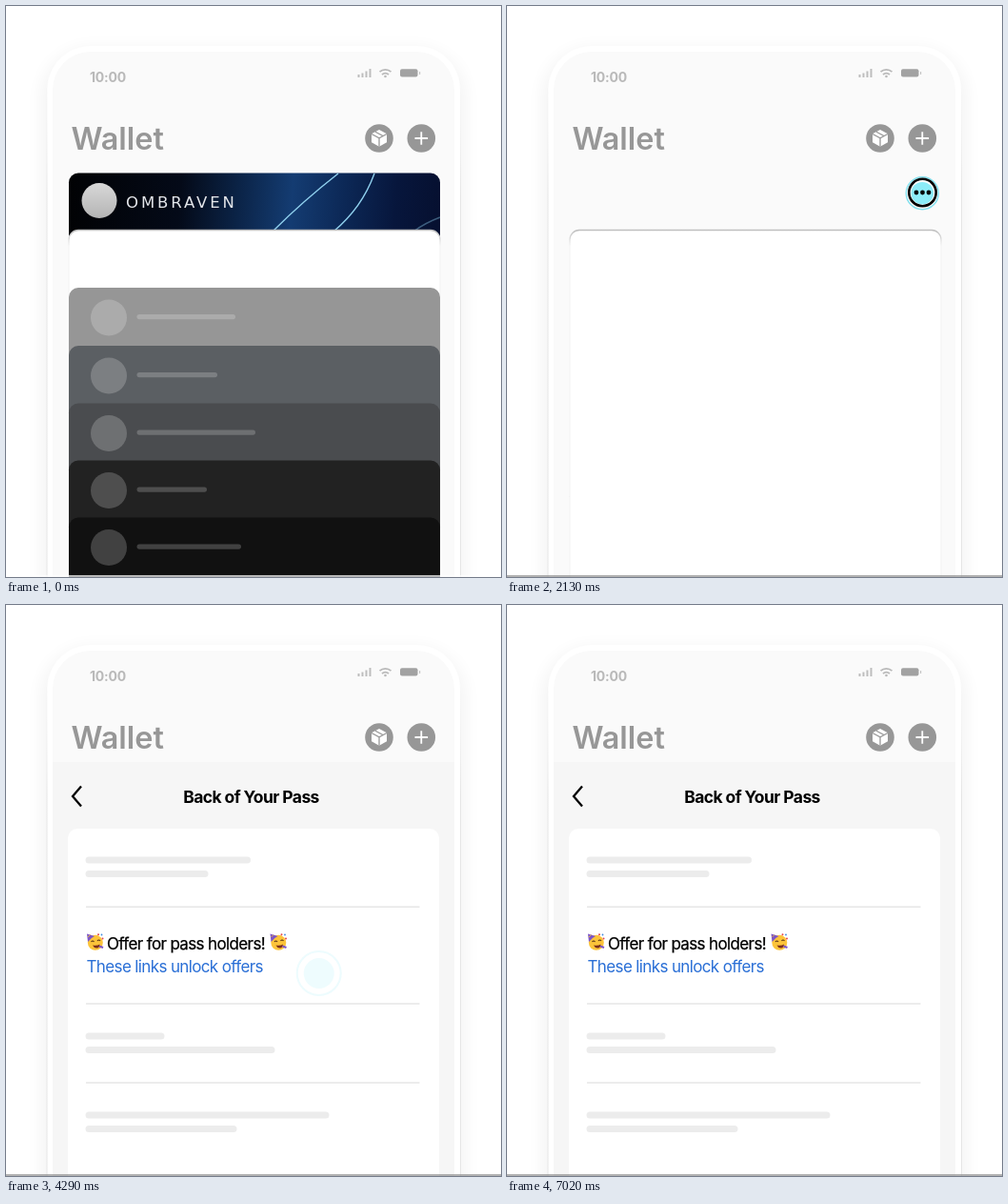
Write an HTML page that moves like this. It is 520x600 px and loops after 7680 ms.

```html
<!DOCTYPE html>
<html lang="en">
<head>
<meta charset="utf-8">
<title>Pass offer</title>
<style>
html, body { margin: 0; width: 100%; height: 100%; overflow: hidden; background: #fff; }
svg { display: block; width: 520px; height: 600px; font-family: Inter, "Liberation Sans", sans-serif; }
.item { font-size: 17px; letter-spacing: -.5px; stroke: #000; stroke-width: .25px; }
.offer { font-size: 17px; letter-spacing: -.63px; }
#touch { mix-blend-mode: multiply; }
</style>
</head>
<body>
<svg viewBox="0 0 520 600" xmlns="http://www.w3.org/2000/svg">
  <defs>
    <linearGradient id="edge" gradientUnits="userSpaceOnUse" x1="0" y1="42" x2="0" y2="200">
      <stop offset="0" stop-color="#f4f4f4" stop-opacity="0"/><stop offset="1" stop-color="#e6e6e6"/>
    </linearGradient>
    <linearGradient id="rim" gradientUnits="userSpaceOnUse" x1="0" y1="235" x2="0" y2="252">
      <stop offset="0" stop-color="#bdbdbd"/><stop offset="1" stop-color="#f4f4f4"/>
    </linearGradient>
    <linearGradient id="night" gradientUnits="userSpaceOnUse" x1="66" y1="190" x2="456" y2="220">
      <stop offset="0" stop-color="#010204"/><stop offset=".3" stop-color="#040a18"/>
      <stop offset=".46" stop-color="#0b2448"/><stop offset=".6" stop-color="#143c72"/>
      <stop offset=".74" stop-color="#0c2856"/><stop offset=".88" stop-color="#07163c"/>
      <stop offset="1" stop-color="#061030"/>
    </linearGradient>
    <linearGradient id="silver" x1="0" y1="0" x2="0" y2="1">
      <stop offset="0" stop-color="#d8d8d8"/><stop offset="1" stop-color="#b4b4b4"/>
    </linearGradient>
    <filter id="soft" x="-20%" y="-20%" width="140%" height="140%"><feGaussianBlur stdDeviation="9"/></filter>
    <filter id="lift" x="-20%" y="-20%" width="140%" height="150%">
      <feDropShadow dx="0" dy="1" stdDeviation="2.5" flood-opacity=".14"/>
    </filter>
    <clipPath id="screen"><path d="M49 600V88a40 40 0 0 1 40-40H431a40 40 0 0 1 40 40V600Z"/></clipPath>
    <clipPath id="burst"><rect x="49" y="274" width="374" height="212"/></clipPath>
    <g id="party">
      <circle cx=".3" cy=".8" r="8" fill="#fcc43a"/>
      <path d="M-8.500-8.500L-.5-6Q-4-4.500-7.500 0Z" fill="#7d55c7"/>
      <path d="M-7.500-5L-5-7.500" stroke="#e0b13c" stroke-width="1"/>
      <path d="M-4 0q1.500-2 3 0M2.500-1q1.500-2 3 0" fill="none" stroke="#5b3415" stroke-width="1.200"/>
      <path d="M-2.500 3.500Q2 4.500 5 2.500Q4.500 7 1.500 6.500Q-1.500 6-2.500 3.500Z" fill="#7c2f1c"/>
      <path d="M4.500 4.500l4 1.500" stroke="#7d55c7" stroke-width="2"/>
      <g fill="#e5484d"><circle cx="3.500" cy="-7.800" r="1"/><circle cx="8" cy="-3.500" r="1"/></g>
      <circle cx="7" cy="-7.500" r=".9" fill="#3f8be0"/>
    </g>
  </defs>

  <rect width="520" height="600" fill="#fff"/>
  <rect x="37" y="44" width="446" height="640" rx="52" fill="#000" opacity=".045" filter="url(#soft)"/>
  <rect x="43" y="42" width="434.500" height="640" rx="46" fill="#fff" stroke="url(#edge)"/>
  <rect x="49" y="48" width="422" height="640" rx="40" fill="#fafafa"/>

  <text x="88" y="79.500" font-size="14" font-weight="700" letter-spacing="-.2" fill="#b9b9b9">10:00</text>
  <path d="M370.500 75v-3M374.500 75v-4.500M378.500 75v-6.500M382.500 75v-9" stroke="#bdbdbd" stroke-width="2"/>
  <path d="M392.500 69.200a9 9 0 0 1 12 0M395 72a5.500 5.500 0 0 1 7 0" fill="none" stroke="#b9b9b9" stroke-width="1.800"/>
  <circle cx="398.500" cy="74" r="1.300" fill="#b9b9b9"/>
  <rect x="414" y="66.300" width="18.500" height="8.200" rx="2" fill="#a2a2a2"/>
  <rect x="434" y="69" width="1.200" height="3" fill="#c4c4c4"/>
  <text x="68.500" y="150.500" font-size="32.400" font-weight="600" fill="#979797">Wallet</text>
  <g fill="#979797"><circle cx="392" cy="139" r="14.800"/><circle cx="436.300" cy="139" r="14.800"/></g>
  <path d="M392 130l8 4.300v9l-8 4.500l-8-4.500v-9Z" fill="#fff"/>
  <path d="M384 134.500l8 4.300l8-4.300M392 138.800v9M388 132.200l8 4.300" fill="none" stroke="#979797" stroke-width="1.300"/>
  <path d="M429.500 139h13.600M436.300 132.200v13.600" stroke="#fff" stroke-width="1.800"/>

  <g id="topCard">
    <rect x="66" y="175.500" width="390" height="440" rx="10" fill="url(#night)"/>
    <g fill="none" stroke="#8fd0ee" stroke-width="1.400">
      <path d="M281 236Q312 205 349 176M344 237Q374 212 387 176"/>
      <path d="M428 237Q440 228 456 222" opacity=".4"/>
    </g>
    <circle cx="98" cy="204.500" r="18.500" fill="url(#silver)"/>
    <text x="126" y="211.500" font-size="16.500" letter-spacing="2.900" fill="#e4e6ea" style="font-family:'DejaVu Sans',sans-serif">OMBRAVEN</text>
  </g>
  <rect x="66" y="235.500" width="390" height="440" rx="10" fill="#fff" stroke="url(#rim)" stroke-width="1.300"/>
  <g id="cards"></g>

  <g id="more">
    <circle cx="436.500" cy="196" r="14.200" fill="#fff" stroke="#000" stroke-width="2.600"/>
    <circle cx="430" cy="196" r="2.400"/><circle cx="436.500" cy="196" r="2.400"/><circle cx="443" cy="196" r="2.400"/>
  </g>

  <g id="menu">
    <rect x="258" y="216.500" width="201" height="105.500" rx="15" fill="#ededed" filter="url(#lift)"/>
    <path d="M258 270.500h201" stroke="#b4b4b4" stroke-width="1.500"/>
    <text class="item" x="276.500" y="250.500">Pass Details</text>
    <text class="item" x="276.500" y="301.500">Notifications</text>
    <g fill="none" stroke="#000" stroke-width="1.600" stroke-linejoin="round">
      <circle cx="427" cy="244" r="10.200"/>
      <path d="M424.500 242.300h2.800v6.700M424 249.200h6.400"/>
      <path d="M416.500 302.500Q419.500 299 419.500 292Q420 285.500 424.500 284.500Q426.500 280.500 428.500 284.500Q433 285.500 433.500 292Q433.500 299 436.500 302.500ZM423.500 303Q426.500 308.500 429.500 303"/>
    </g>
    <circle cx="427" cy="238.800" r="1.500"/>
    <circle cx="434.500" cy="291" r="4"/>
  </g>

  <g clip-path="url(#screen)">
    <g id="sheet">
      <rect x="49" y="165" width="422" height="480" fill="#f6f6f6"/>
      <path d="M79 190.500L70 201L79 211.500" fill="none" stroke="#000" stroke-width="2.300"/>
      <text x="257.500" y="207.500" text-anchor="middle" font-size="17.500" font-weight="700" letter-spacing="-.6">Back of Your Pass</text>
      <rect x="65" y="235" width="390" height="440" rx="10" fill="#fff"/>
      <path d="M87 268H253.500M87 282.500H209M87 453H163M87 467.500H279M87 536H336M87 550.500H239" stroke="#ececec" stroke-width="7" stroke-linecap="round"/>
      <path d="M84 317.200H434.500M84 419H434.500M84 502H434.500" stroke="#e6e6e6" stroke-width="1.500"/>
      <use href="#party" x="93.500" y="354"/>
      <text class="item offer" x="106" y="361.500">Offer for pass holders!</text>
      <use href="#party" x="286" y="354"/>
      <text class="offer" x="84.500" y="385.500" fill="#2a6fd6">These links unlock offers</text>
    </g>
  </g>

  <g id="confetti" clip-path="url(#burst)"></g>
  <rect id="baseline" y="598.300" width="520" height="1.400"/>
  <g id="touch">
    <circle r="16" fill="#8cecf8"/>
    <circle r="23" fill="none" stroke="#86e6f4" stroke-width="2"/>
  </g>
</svg>
<script>
const LOOP = 7680;
const $ = id => document.getElementById(id);
const clamp = v => Math.min(1, Math.max(0, v));
const span = (t, from, to) => clamp((t - from) / (to - from));
const mix = (a, b, u) => a + (b - a) * u;
const quad = u => u < .5 ? 2 * u * u : 1 - 2 * (1 - u) ** 2;
const cubic = u => u < .5 ? 4 * u ** 3 : 1 - 4 * (1 - u) ** 3;
const easeOut = u => 1 - (1 - u) ** 3;
const move = (el, value) => el.setAttribute('transform', value);
const fade = (el, value) => el.setAttribute('opacity', value.toFixed(3));

function add(parent, name, attrs) {
  const el = document.createElementNS('http://www.w3.org/2000/svg', name);
  for (const key in attrs) el.setAttribute(key, attrs[key]);
  return parent.appendChild(el);
}

// Lower cards leave first.
const cards = [
  { y: 296, color: '#969696', end: 241, start: 816 },
  { y: 357, color: '#5b5f63', end: 222, start: 743 },
  { y: 417.5, color: '#4a4c4f', end: 262, start: 696 },
  { y: 477.5, color: '#222', end: 211, start: 645 },
  { y: 537.5, color: '#111', end: 247, start: 590 }
];
for (const card of cards) {
  const { y, color, end } = card;
  card.el = add($('cards'), 'g', {});
  add(card.el, 'rect', { x: 66, y, width: 390, height: 440, rx: 10, fill: color });
  const marks = add(card.el, 'g', { fill: '#fff', opacity: .2 });
  add(marks, 'circle', { cx: 108, cy: y + 31.5, r: 19 });
  add(marks, 'rect', { x: 137.5, y: y + 28, width: end - 137.5, height: 5.2, rx: 2.6 });
}

const taps = [
  { start: 1450, from: [525, 201], to: [436.3, 196.7] },
  { start: 2480, from: [470, 249], to: [381, 243] },
  { start: 4245, from: [329, 387], to: [240, 382] }
];

let seed = 29;
const random = () => (seed = seed * 16807 % 2147483647) / 2147483647;
const colors = ['#1c2fb8', '#1f7a4a', '#c4267e', '#e8d21c', '#e0323c', '#2aa7a0', '#7b3bc4', '#e08a2c', '#5ab04a', '#27303f'];
const pieces = Array.from({ length: 130 }, (_, i) => {
  const angle = random() * Math.PI * 2;
  const reach = mix(.1, 1, random()) ** .42;
  const w = mix(3, 8.5, random() ** 1.6), h = mix(1.3, 3.4, random());
  return {
    dx: Math.cos(angle) * reach * 188, dy: Math.sin(angle) * reach * 118,
    turn: random() * 360, spin: mix(-420, 420, random()),
    phase: random() * 6.28, flip: mix(5, 13, random()),
    el: add($('confetti'), 'rect', {
      x: -w / 2, y: -h / 2, width: w, height: h, rx: .6,
      fill: colors[i % colors.length], 'fill-opacity': mix(.5, 1, random() ** .5)
    })
  };
});

function drawTouch(t) {
  const tap = taps.find(({ start }) => t >= start && t < start + 1010);
  if (!tap) return fade($('touch'), 0);
  const age = t - tap.start;
  const along = cubic(span(age, 0, 500));
  const release = span(age, 700, 1000);
  const pressed = 1 - .27 * quad(span(age, 550, 700));
  const scale = mix(pressed, 1.75, easeOut(release));
  const [x, y] = [0, 1].map(k => mix(tap.from[k], tap.to[k], along));
  move($('touch'), `translate(${x} ${y}) scale(${scale})`);
  fade($('touch'), span(age, 0, 300) * (1 - release));
}

function drawConfetti(t) {
  const u = span(t, 5235, 7020);
  $('confetti').style.display = u > 0 && u < 1 ? '' : 'none';
  const out = 1 - Math.exp(-7 * u);
  for (const p of pieces) {
    const x = 232 + p.dx * out, y = 379 + p.dy * out + 8 * u * u;
    const tilt = mix(.25, 1, Math.abs(Math.cos(p.phase + p.flip * u)));
    move(p.el, `translate(${x} ${y}) rotate(${p.turn + p.spin * u}) scale(1 ${tilt})`);
  }
  fade($('confetti'), 1 - span(t, 6600, 7020));
}

function draw(t) {
  move($('topCard'), `translate(0 ${330 * quad(span(t, 590, 1340))})`);
  for (const c of cards) move(c.el, `translate(0 ${330 * quad(span(t, c.start, c.start + 750))})`);

  const closing = 1 - span(t, 3270, 3500);
  const open = easeOut(span(t, 2250, 2550));
  const size = mix(.4, 1, open);
  fade($('more'), span(t, 700, 1000) * closing);
  fade($('menu'), open * closing);
  move($('menu'), `translate(436 216) scale(${size}) translate(-436 -216)`);

  $('sheet').style.display = t > 3330 ? '' : 'none';
  move($('sheet'), `translate(0 ${440 * (1 - cubic(span(t, 3330, 4050)))})`);
  $('baseline').setAttribute('fill', t < 1350 ? '#fff' : '#929292');
  drawTouch(t);
  drawConfetti(t);
}

const began = performance.now();
function frame() {
  draw((performance.now() - began) % LOOP);
  requestAnimationFrame(frame);
}
frame();
</script>
</body>
</html>
```
